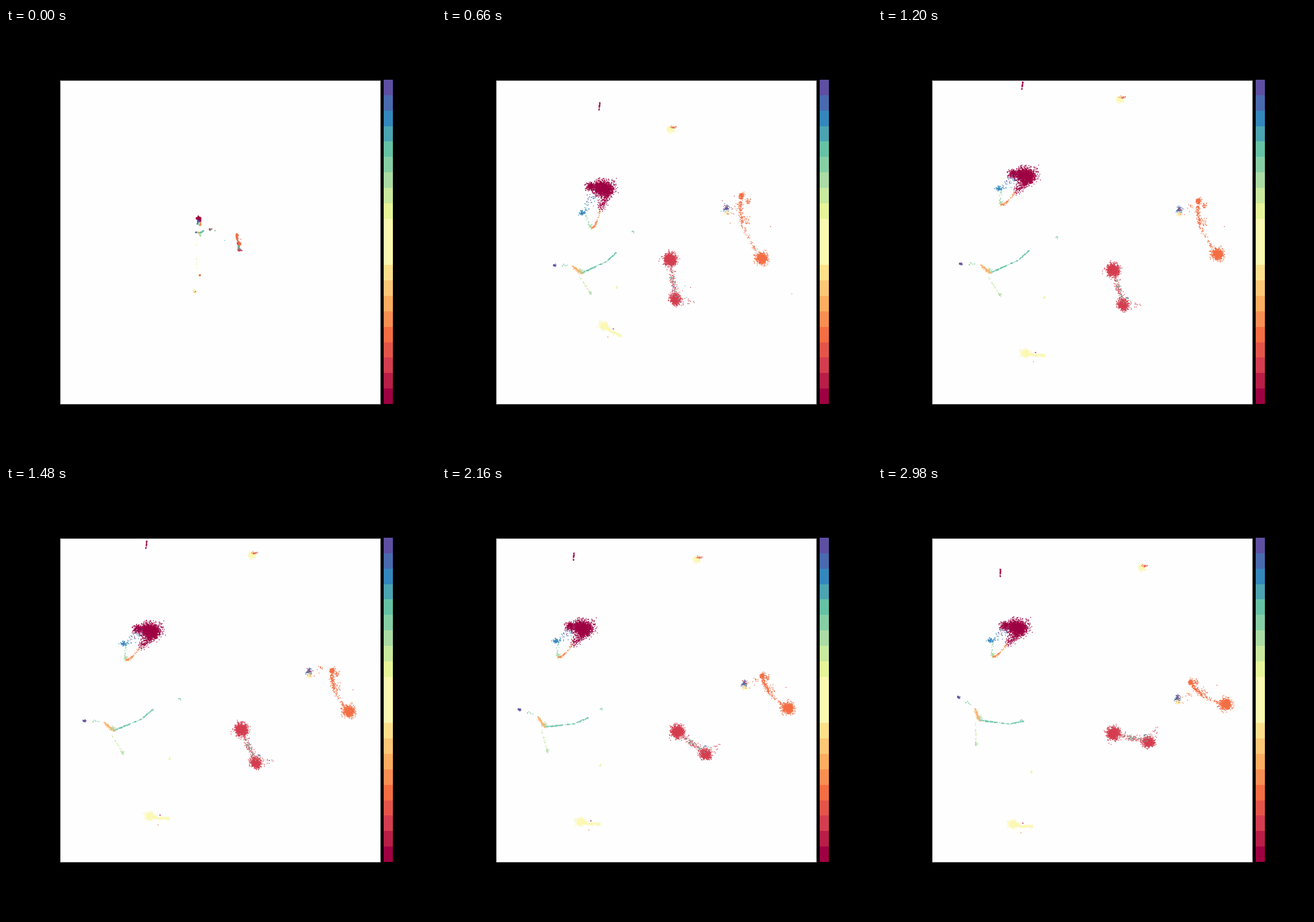
A matplotlib script that plays this animation: 748x748 px, repeating every 3.03 s.

```python
import matplotlib.pyplot as plt
import numpy as np
from matplotlib.animation import FuncAnimation
from matplotlib.patches import Rectangle

SIZE, DPI = 748, 100
INTERVAL, FRAMES = 15, 202
STEP, LAST = 20, 2980
BURST = 380  # ms until the clusters have unfolded
rng = np.random.default_rng(7)

spectral = plt.get_cmap("Spectral")
colors = [spectral(i / 20) for i in range(21)]
colors[9:12] = ["#fbf8b0"] * 3

fig = plt.figure(figsize=(SIZE / DPI, SIZE / DPI), dpi=DPI, facecolor="black")
ax = fig.add_axes([0, 0, 1, 1])
ax.set(xlim=(0, SIZE), ylim=(SIZE, 0))
ax.axis("off")
panel = ax.add_patch(Rectangle((94.5, 90.5), 557, 563, fc="#fefefe", ec="#777777", lw=72 / DPI))
band = 564 / 21
for i, c in enumerate(colors):
    top = round(654 - (i + 1) * band)
    ax.add_patch(Rectangle((657, top), 16, round(654 - i * band) - top, fc=c, lw=0))


def swap(t, a, b, mid, width):
    """Sigmoid change from a to b around time mid."""
    return a + (b - a) / (1 + np.exp((mid - t) / width))


def bump(t):
    """Pulse that is 0 at the start and 1 at BURST, then fades."""
    u = t / BURST
    return (u * np.exp(1 - u)) ** 4


def grow(t, first):
    return first + (1 - first) * min(1, t / BURST)


def body(birth, home, drift=0, kick=0, tau=600, turn=(0, 0, 1, 1), size=(1, 1, 1, 1)):
    """Rigid pose over time: a decaying pull from birth to a slowly drifting home."""
    def pose(t):
        rest = home + drift * (1 - t / LAST)
        pull = np.exp(-((t / tau) ** 1.3))
        center = rest + (birth - home - drift) * pull + kick * bump(t)
        spin = np.exp(1j * np.radians(swap(t, *turn)))
        return center, spin * swap(t, *size), spin
    return pose


groups = []


def group(color, n, pose, knots, spread, power=1, loose=0):
    """Scatter n points along the knots (complex, local to the body)."""
    knots = np.atleast_1d(np.array(knots, complex))
    u = rng.random(n) ** power
    local = np.interp(u * (len(knots) - 1), np.arange(len(knots)), knots)
    noise = rng.normal(size=n) + 1j * rng.normal(size=n)
    jitter = noise.real * np.real(spread) + 1j * noise.imag * np.imag(spread)
    line, = ax.plot([], [], "s", color=colors[color], ms=1.4 * 72 / DPI, mew=0)
    line.set_clip_path(panel)
    groups.append((line, pose, local, jitter, noise * loose))


# Dark red mass with the blue cluster and hooked tail swinging around it
way = dict(birth=335 + 331j, home=241 + 245j, drift=6, tau=680)
mass = body(**way)
skirt = body(**way, turn=(-50, 0, 650, 90), size=(1.2, 1, 650, 90))
group(0, 1400, mass, 0, 8.5 + 6.3j)
group(0, 190, mass, -21 - 2j, 4 + 3.5j)
group(0, 360, skirt, [9 + 4j, 1 + 14j, -17 + 28j], 3.6 + 3.6j, power=1.4)
group(18, 55, skirt, -46 + 23j, 2.4 + 2.2j)
group(18, 24, skirt, [-42 + 21j, -20 + 5j], 4 + 4j)
group(20, 14, skirt, [-36 + 15j, -16 + 5j], 4 + 4j)
group(15, 14, skirt, [-44 + 28j, -42 + 47j], 2 + 2j)
group(14, 30, skirt, -42 + 49j, 1.3 + 2j)
group(5, 75, skirt, [-41 + 51j, -37 + 51j, -30 + 45j, -17 + 30j], 0.8 + 0.8j, power=1.25)

# Thin red sliver
sliver = body(334 + 328j, 212 + 151j, drift=60 - 107j, tau=500, turn=(8, 0, 2100, 250))
group(0, 34, sliver, [-7j, 8j], 0.25 + 0.3j, power=1.6)

# Pale patch at the top with red specks
patch = body(336 + 430j, 459 + 142j, drift=-60 - 56j, kick=-10j, tau=500)
group(10, 150, patch, [-2, 2], 3 + 3j)
group(3, 16, patch, 5 - 3.5j, 2.2 + 1.2j)

# Pale drift at the bottom
dune = body(327 + 456j, 234 + 588j, drift=20 - 10j, kick=6 - 30j, tau=700,
            turn=(52, 0, 650, 90))
group(10, 240, dune, 0, 4.2 + 3.8j)
group(10, 190, dune, [-2, 14 + 3j, 34 + 4j], 1.6 + 1.4j)
group(1, 2, dune, 17 - 2j, 1.5 + 1j)
group(4, 1, dune, 14 + 15j, 0.1 + 0.1j)

# Two red clusters joined by a bridge
pair = body(404 + 374j, 409 + 430j, drift=-12j, kick=-24 - 17j, tau=500,
            turn=(88, 3, 2000, 500), size=(1.2, 1, 670, 80))
group(2, 950, pair, 0, 5 + 5j)
group(2, 620, pair, 63, 4.6 + 4.2j)
group(2, 90, pair, [15, 54], 2.6 + 2.6j)
group(16, 26, pair, [18, 58], 2.4 + 2.4j)
group(2, 12, pair, [66 - 10j, 72 - 30j], 2 + 2j, power=1.5)

# Orange cluster; its arm points along the local x axis
arc = body(406 + 375j, 604 + 379j, drift=-10 + 25j, kick=8 + 18j, tau=500,
           turn=(253, 208, 2200, 350), size=(1.6, 1, 1250, 100))
group(4, 650, arc, 0, 4.7 + 4.7j)
group(4, 65, arc, 72, 2.2 + 2.2j)
group(4, 190, arc, [72, 57 - 6j, 41 - 9j, 10 - 3j], 2 + 1.6j, power=1.35)
group(4, 28, arc, 63 + 5j, 2.4 + 2.4j)
group(4, 28, arc, 45 - 4j, 5 + 4j)
group(3, 1, arc, 30 + 20j, 0.1 + 0.1j)

# Blue and amber knot
knot = body(354 + 350j, 520 + 369j, drift=18 - 95j, kick=8, tau=500)
group(19, 48, knot, [1 - 4j, -1 + 3j], 1.9 + 1.6j)
group(1, 6, knot, 0, 2.5 + 3j)
group(8, 30, knot, 1 + 8j, 3.2 + 2.2j)
group(4, 12, knot, [8 + 4j, 28 - 8j], 2 + 4j)

# Stray points flung out during the burst
for home, spot in ((pair, 58 - 8j), (knot, 2 + 2j)):
    for c in (2, 4, 16, 19):
        group(c, 4, home, spot, 3 + 3j, loose=20)
outlier = body(380 + 369j, 604 + 379j, kick=120 + 179j, tau=500)
group(16, 1, outlier, 0, 0.1 + 0.1j)

# Left branch: violet tip, amber bend, teal arm, green stem
branch = body(335 + 356j, 172 + 399j, drift=50j, kick=18 + 32j, tau=620,
              turn=(-33, 0, 2100, 250), size=(0.7, 1, 600, 80))
group(20, 24, branch, [-34 - 34j, -30 - 31j], 1.2 + 0.7j)
group(15, 9, branch, [-22 - 26j, -11 - 19j], 1 + 0.8j)
group(6, 85, branch, [-3 - 12j, 0, 4 + 8j], 1.2 + 1.4j)
group(14, 18, branch, 5 + 4j, 2.5 + 2j)
group(16, 115, branch, [5 + 8j, 26 + 11j, 55 + 15j, 81 + 11j], 0.4 + 0.4j)
group(13, 22, branch, [-3 + 12j, -3 + 30j, -3 + 50j], 0.7 + 0.7j)
group(14, 14, branch, -3 + 49j, 1.2 + 1.2j)

# Slow specks; the lime ones begin as a long dotted line
speck = body(363 + 352j, 248 + 408j, drift=105 - 75j, tau=500)
group(16, 5, speck, 0, 1 + 1j)
lime = body(331 + 420j, 266 + 498j, drift=30 - 40j, tau=700, size=(6, 0.02, 150, 35))
group(12, 8, lime, [0, -50j], 0.8 + 1j)


def update(i):
    t = min(i * INTERVAL // STEP * STEP, LAST)
    shake = 0.25 * (1 - t / LAST) * min(1, t / BURST)
    wobble = np.random.default_rng(t)
    for line, pose, local, jitter, stray in groups:
        center, scale, spin = pose(t)
        z = center + scale * local * grow(t, 0.15) + spin * jitter * grow(t, 0.12)
        z = z + stray * bump(t) + wobble.normal(0, shake, len(z))
        line.set_data(z.real, z.imag)
    return [g[0] for g in groups]


anim = FuncAnimation(fig, update, frames=FRAMES, interval=INTERVAL, repeat=True, repeat_delay=0)
plt.show()
```
